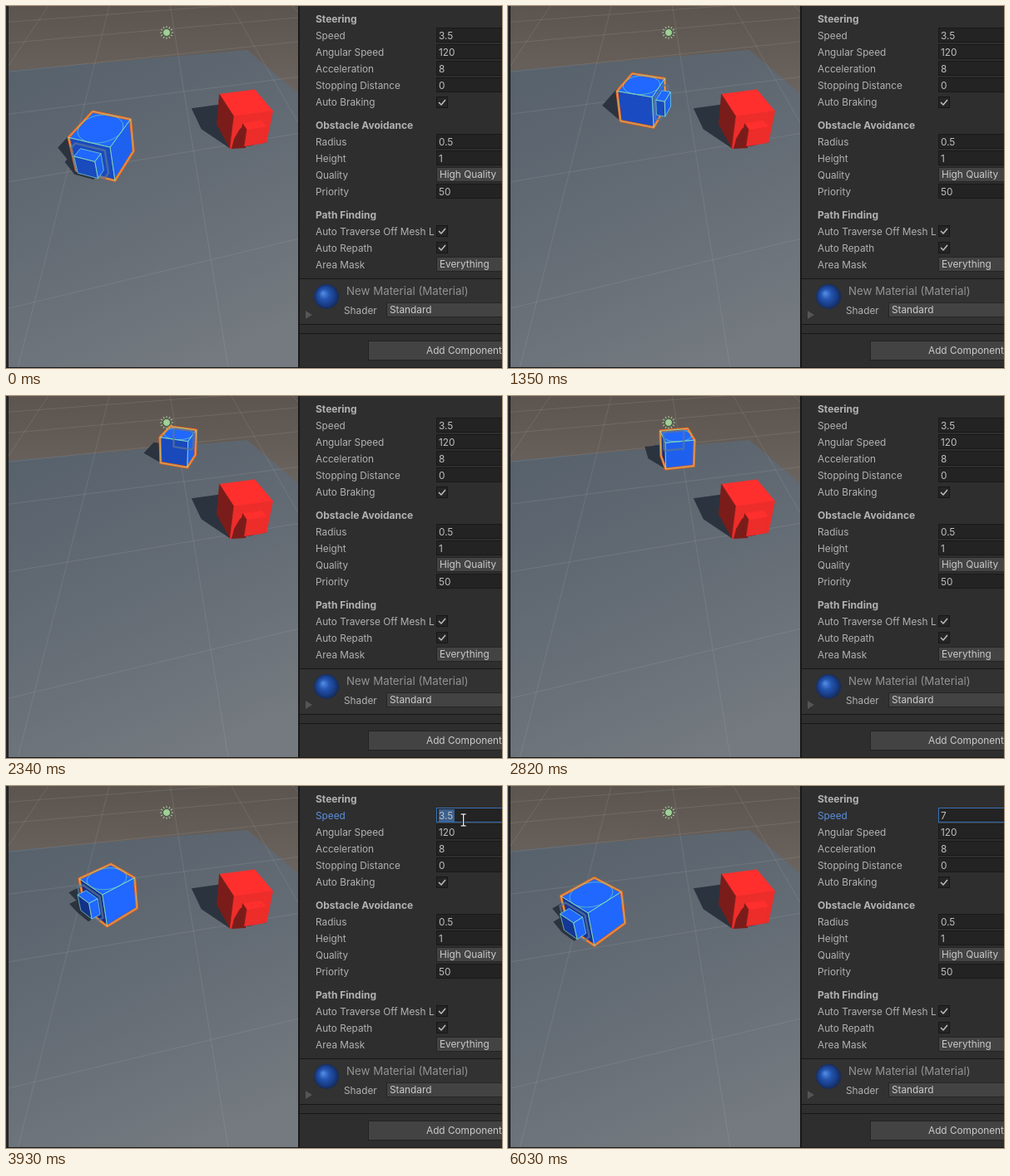
Write an HTML page with a canvas that moves like this. It is 596 px wide and 436 px high and loops after 8 s.

```html
<!DOCTYPE html>
<html lang="en">
<head>
<meta charset="utf-8">
<title>Agent settings</title>
<style>
  html, body { margin: 0; width: 100%; height: 100%; overflow: hidden; background: #2e2e2e; }
  canvas { display: block; }
</style>
</head>
<body>
<canvas id="stage" width="596" height="436"></canvas>
<script>
const c = document.getElementById('stage').getContext('2d');
const LOOP = 8000, STEP = 70, START = 580;

// Camera: focal length, centre, height over the floor, pitch
const F = 380, CX = 203, CY = 100, H = 5.5, PITCH = 32 * Math.PI / 180;
const SIN = Math.sin(PITCH), COS = Math.cos(PITCH);
const HORIZON = CY - F * SIN / COS;
const SUN = { x: 0.67, d: -0.77, angle: 47 };

const RED = { dark: [122, 29, 26], light: [255, 47, 45] };
const BLUE = { dark: [19, 46, 128], light: [32, 104, 255] };
const LABEL = '#b2b2b2', VALUE = '#c0c0c0';

// time, floor point on screen, heading in degrees (0 right, 90 to the viewer)
const ROUTE = [
  [540, 120, 186, 108], [940, 137, 165, 68], [1350, 163, 130, 17],
  [1840, 190, 97, -45], [2190, 204, 80, -70], [2450, 208, 74, -72],
  [2820, 203, 78, -102], [3030, 193, 88, -127], [3440, 161, 113, -176],
  [3860, 127, 147, -226], [4240, 107, 168, -232]
];
const POINTER = [[3170, 602, 130], [3440, 533, 69], [3860, 546, 46], [4000, 552, 38]];

// Smooth curve through timed keys, at rest at both ends
function track(keys, t) {
  const last = keys.length - 1;
  if (t <= keys[0][0]) return keys[0].slice(1);
  if (t >= keys[last][0]) return keys[last].slice(1);
  let i = 0;
  while (t >= keys[i + 1][0]) i++;
  const a = keys[i], b = keys[i + 1], span = b[0] - a[0], u = (t - a[0]) / span;
  const slope = (k, n) => k <= 0 || k >= last ? 0 :
    (keys[k + 1][n] - keys[k - 1][n]) / (keys[k + 1][0] - keys[k - 1][0]);
  return a.slice(1).map((v, j) => {
    const n = j + 1, m0 = slope(i, n) * span, m1 = slope(i + 1, n) * span;
    const s = u * u * (3 - 2 * u);
    return v + (b[n] - v) * s + m0 * u * (1 - u) ** 2 - m1 * u * u * (1 - u);
  });
}

function project(x, h, d) {
  const z = d * COS + (H - h) * SIN;
  return [CX + F * x / z, CY + F * ((H - h) * COS - d * SIN) / z];
}

function floorPoint(sx, sy) {
  const s = (sy - HORIZON) * COS / H;
  return { x: (sx - CX) / s, d: (F / s - H * SIN) / COS };
}

function shape(pts, fill, stroke, width = 1) {
  c.beginPath();
  pts.forEach(p => c.lineTo(p[0], p[1]));
  c.closePath();
  if (fill) { c.fillStyle = fill; c.fill(); }
  if (stroke) { c.strokeStyle = stroke; c.lineWidth = width; c.stroke(); }
}

function line(x1, y1, x2, y2, colour, width = 1) {
  c.strokeStyle = colour;
  c.lineWidth = width;
  c.beginPath();
  c.moveTo(x1, y1);
  c.lineTo(x2, y2);
  c.stroke();
}

function rect(x, y, w, h, colour) {
  c.fillStyle = colour;
  c.fillRect(x, y, w, h);
}

function area(p) {
  return p.reduce((sum, a, i) => {
    const b = p[(i + 1) % p.length];
    return sum + a[0] * b[1] - b[0] * a[1];
  }, 0);
}

function hull(pts) {
  const sorted = [...pts].sort((a, b) => a[0] - b[0] || a[1] - b[1]);
  const half = list => {
    const out = [];
    for (const p of list) {
      while (out.length > 1 && area([out[out.length - 2], out[out.length - 1], p]) <= 0) out.pop();
      out.push(p);
    }
    return out.slice(0, -1);
  };
  return [...half(sorted), ...half(sorted.reverse())];
}

function shade(ramp, k) {
  k = Math.max(0, Math.min(1, k));
  return `rgb(${ramp.dark.map((v, i) => Math.round(v + (ramp.light[i] - v) * k))})`;
}

// A box in the cube's own axes: u forward, v sideways, h up
function makeBox(pos, deg, u0, u1, v, h0, h1) {
  const a = deg * Math.PI / 180, ca = Math.cos(a), sa = Math.sin(a);
  const ring = [[u1, v], [u0, v], [u0, -v], [u1, -v]].map(([u, w]) =>
    ({ x: pos.x + u * ca - w * sa, d: pos.d - u * sa - w * ca }));
  const level = h => ring.map(p => project(p.x, h, p.d));
  const cast = h => ring.map(p => project(p.x - SUN.x * h, 0, p.d - SUN.d * h));
  const low = level(h0), top = level(h1);
  const faces = [{ pts: top, lit: 1 }];
  for (let i = 0; i < 4; i++) {
    const j = (i + 1) % 4, pts = [top[i], top[j], low[j], low[i]];
    const turn = (deg + 90 * (i + 1) - SUN.angle) * Math.PI / 180;
    if (area(pts) < 0) faces.push({ pts, lit: Math.cos(turn) });
  }
  return { faces, edge: hull([...low, ...top]), shadow: hull([...cast(h0), ...cast(h1)]) };
}

function cube(sx, sy, deg, ramp, selected) {
  const pos = floorPoint(sx, sy);
  const body = makeBox(pos, deg, -0.5, 0.5, 0.5, 0, 1);
  const nose = makeBox(pos, deg, 0.5, 0.75, 0.25, 0.25, 0.75);
  const halo = makeBox(pos, deg, 0.5, 0.65, 0.36, 0.2, 0.87);
  const facing = Math.sin(deg * Math.PI / 180) > -0.1;
  const paint = box => box.faces.forEach(f => {
    const colour = shade(ramp, f.lit);
    shape(f.pts, colour, colour, 0.6);
  });
  const wire = box => box.faces.forEach(f => shape(f.pts, null, 'rgba(140,226,190,.75)', 0.9));

  for (const box of [body, nose]) shape(box.shadow, '#2b333f');
  if (!facing) paint(nose);
  paint(body);
  if (selected) {
    shape(body.edge, null, '#f8640f', 3);
    wire(body);
    const circle = [];
    for (let i = 0; i < 32; i++) {
      const a = i * Math.PI / 16;
      circle.push(project(pos.x + 0.5 * Math.cos(a), 1, pos.d + 0.5 * Math.sin(a)));
    }
    shape(circle, null, 'rgba(120,215,180,.7)', 0.9);
    shape(halo.edge, null, 'rgba(88,116,152,.75)', 2.4);
  } else {
    shape([[271, 172], [274, 160], [281, 148], [286, 144], [291, 153], [288, 171]], shade(ramp, 0));
  }
  if (facing) {
    paint(nose);
    if (selected) wire(nose);
  }
}

function grid(colour) {
  for (let k = -5; k < 9; k++) {
    const dx = (11 + 98 * k - 169) / 238;
    line(169 + dx * 178, 0, 169 + dx * 614, 436, colour);
  }
  for (let k = 0; k < 8; k++) {
    const depth = 1 / (0.00208 + 0.0009 * k), y = depth - 140, m = depth * 0.0005;
    line(3, y + 97 * m, 351, y - 251 * m, colour);
  }
}

function sunIcon(x, y) {
  for (let i = 0; i < 12; i++) {
    const a = i * Math.PI / 6, cos = Math.cos(a), sin = Math.sin(a);
    line(x + cos * 5.5, y + sin * 5.5, x + cos * 8, y + sin * 8, '#a0c294', 1.1);
  }
  c.beginPath();
  c.arc(x, y, 4.5, 0, 7);
  c.fillStyle = '#a0cf97';
  c.fill();
  c.strokeStyle = '#42533f';
  c.lineWidth = 1;
  c.stroke();
}

function scene(t) {
  c.save();
  c.beginPath();
  c.rect(3, 0, 348, 436);
  c.clip();
  const sky = c.createLinearGradient(0, 0, 0, 105);
  sky.addColorStop(0, '#5b544f');
  sky.addColorStop(1, '#6c645e');
  rect(0, 0, 352, 436, sky);
  const ground = c.createLinearGradient(60, 60, 230, 436);
  ground.addColorStop(0, '#58626c');
  ground.addColorStop(0.5, '#646c75');
  ground.addColorStop(1, '#747a7f');
  shape([[3, 78], [290, 53], [351, 105], [351, 436], [3, 436]], ground);
  grid('rgba(205,200,200,.14)');
  cube(282, 153, 77, RED, false);
  const step = t < START ? 0 : START + Math.floor((t - START) / STEP) * STEP;
  const [x, y, a] = track(ROUTE, step);
  cube(x, y, a, BLUE, true);
  sunIcon(193, 32);
  c.restore();
}

function text(str, x, y, colour = LABEL, size = 11.8, weight = 400) {
  c.font = `${weight} ${size}px Inter, Roboto, sans-serif`;
  c.fillStyle = colour;
  c.textBaseline = 'middle';
  c.fillText(str, x, y + 0.5);
}

function heading(str, y) {
  text(str, 372, y, LABEL, 12, 700);
}

function field(y, border = '#191919') {
  rect(517, y - 10, 90, 18, border);
  rect(518, y - 9, 90, 16, '#232323');
}

function dropdown(x, y, value) {
  rect(x, y - 9, 150, 18, '#252525');
  rect(x + 1, y - 8, 150, 16, '#434343');
  text(value, x + 4, y, '#cacaca');
}

function check(y) {
  rect(517, y - 7, 14, 14, '#171717');
  rect(518, y - 6, 12, 12, '#252525');
  c.strokeStyle = '#bcbcbc';
  c.lineWidth = 1.5;
  c.beginPath();
  c.moveTo(520, y);
  c.lineTo(523, y + 3);
  c.lineTo(528, y - 3);
  c.stroke();
}

function number(label, y, value, focus, hover) {
  text(label, 372, y, focus ? '#5d8fdc' : hover ? '#9cb0c0' : LABEL);
  field(y, focus ? '#3872b8' : hover ? '#6a6a6a' : undefined);
  text(value, 520, y, VALUE);
}

function pointer(x, y) {
  for (const [colour, w] of [['#151515', 3], ['#eeeeee', 1.3]]) {
    line(x, y - 7, x, y + 7, colour, w);
    line(x - 3, y - 7, x + 3, y - 7, colour, w);
    line(x - 3, y + 7, x + 3, y + 7, colour, w);
  }
}

function panel(t) {
  rect(351, 0, 245, 436, '#2e2e2e');
  rect(351, 0, 2, 436, '#181818');
  rect(0, 0, 2, 436, '#2a2a2a');
  rect(2, 0, 1, 436, '#151515');

  const focus = t >= 3930, typed = t >= 5360;
  const shown = t >= 3170 && t < 5760;
  const [px, py] = track(POINTER, t);
  const hover = y => shown && px > 517 && px < 596 && Math.abs(py - y) < 9;

  heading('Steering', 16);
  number('Speed', 36, typed ? '7' : '3.5', focus, hover(36));
  if (focus && !typed) {
    rect(520, 28, 19, 15, '#3b608f');
    text('3.5', 520, 36, VALUE);
  }
  number('Angular Speed', 56, '120', false, hover(56));
  number('Acceleration', 76, '8', false, hover(76));
  number('Stopping Distance', 96, '0', false, hover(96));
  text('Auto Braking', 372, 116);
  check(116);

  heading('Obstacle Avoidance', 144);
  number('Radius', 164, '0.5');
  number('Height', 184, '1');
  text('Quality', 372, 204);
  dropdown(517, 203, 'High Quality');
  number('Priority', 224, '50');

  heading('Path Finding', 252);
  text('Auto Traverse Off Mesh L', 372, 272);
  check(271);
  text('Auto Repath', 372, 292);
  check(291);
  text('Area Mask', 372, 312);
  dropdown(517, 311, 'Everything');

  rect(353, 328, 243, 1, '#171717');
  rect(353, 329, 243, 54, '#323232');
  rect(353, 383, 243, 1, '#171717');
  rect(353, 394, 243, 1, '#171717');
  const ball = c.createRadialGradient(381, 346, 1, 385, 350, 16);
  ball.addColorStop(0, '#4f86de');
  ball.addColorStop(0.35, '#2355b0');
  ball.addColorStop(0.7, '#193d86');
  ball.addColorStop(1, '#17264a');
  c.fillStyle = ball;
  c.beginPath();
  c.arc(385, 350, 15, 0, 7);
  c.fill();
  shape([[360, 367], [368, 372], [360, 377]], '#555555');
  text('New Material (Material)', 409, 343, '#929292', 13.3);
  text('Shader', 406, 367);
  dropdown(457, 366, 'Standard');

  rect(435, 403, 170, 24, '#222222');
  rect(436, 404, 170, 22, '#434343');
  text('Add Component', 505, 415, '#cacaca');
  rect(0, 435, 596, 1, '#181818');
  if (shown) pointer(px, py);
}

c.lineJoin = 'round';
function frame(now) {
  const t = now % LOOP;
  scene(t);
  panel(t);
  requestAnimationFrame(frame);
}
requestAnimationFrame(frame);
</script>
</body>
</html>
```
